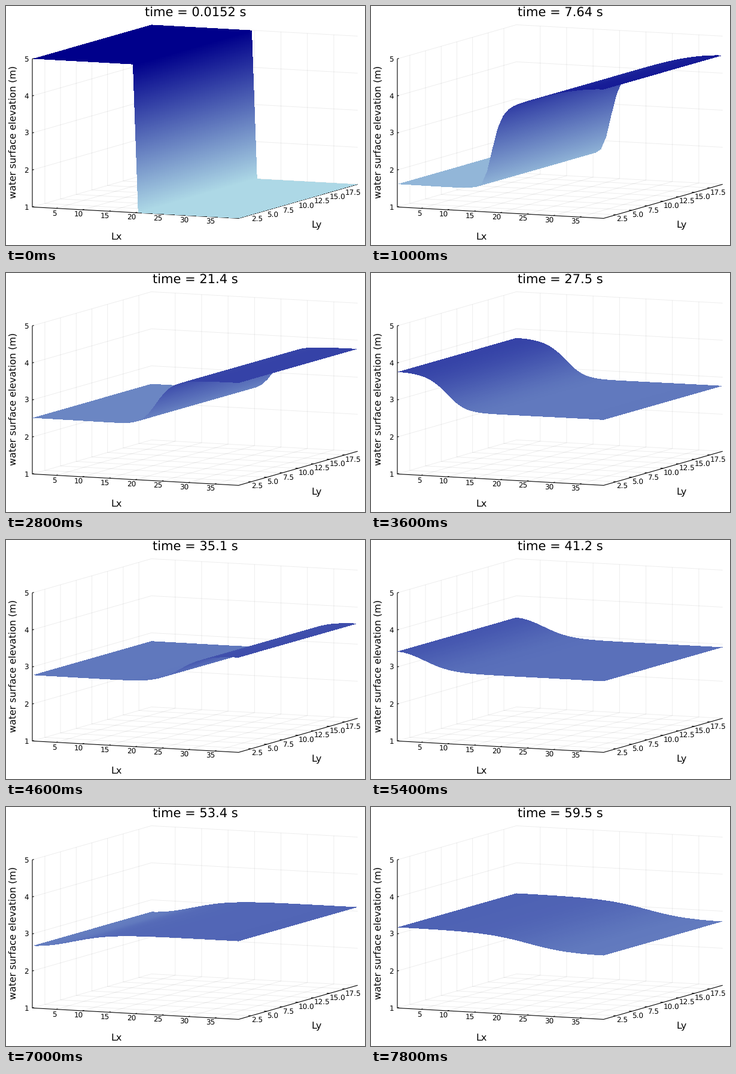
A matplotlib script for the animation above (8000 ms loop, 600 by 400 pixels).

```python
import numpy as np
import matplotlib.pyplot as plt
from matplotlib.animation import FuncAnimation
from matplotlib.collections import LineCollection
from matplotlib.colors import LinearSegmentedColormap

W, H, DPI = 600, 400, 100
FRAMES, INTERVAL = 40, 200

# Oblique projection: screen offsets of the full x, y and z ranges
X0, Y0 = 44.0, 336.4
AX = np.array([344.7, 19.0])
AY = np.array([199.0, -57.0])
AZ = np.array([0.0, -248.0])

# Shallow water model, one cell per metre
CELLS, G, DT, SKIP = 40, 10.0, 0.015245, 100
X_MIN, X_MAX = 0.5, 39.5
Y_MIN, Y_MAX = 0.5, 19.5
Z_MIN, Z_MAX = 1.0, 5.0

plt.rcParams["font.family"] = "DejaVu Sans"
plt.rcParams["text.hinting"] = "no_hinting"
plt.rcParams["text.hinting_factor"] = 1


def roe_step(h, q):
    """One Euler step with Roe fluxes and solid walls at both ends."""
    h = np.r_[h[0], h, h[-1]]
    q = np.r_[-q[0], q, -q[-1]]
    u, root = q / h, np.sqrt(h)
    state = np.array([h, q])
    flux = np.array([q, q * u + G * h**2 / 2])
    u_mean = ((root * u)[:-1] + (root * u)[1:]) / (root[:-1] + root[1:])
    c_mean = np.sqrt(G * (h[:-1] + h[1:]) / 2)
    sl = np.minimum(u_mean - c_mean, 0)
    sr = np.maximum(u_mean + c_mean, 0)
    jump = np.diff(state, axis=1)
    f = (sr * flux[:, :-1] - sl * flux[:, 1:] + sl * sr * jump) / (sr - sl)
    return state[:, 1:-1] - DT * np.diff(f, axis=1)


def simulate():
    h = np.where(np.arange(CELLS) < CELLS // 2, 5.0, 1.0)
    q = np.zeros(CELLS)
    history = [h]
    for _ in range(FRAMES - 1):
        for _ in range(SKIP):
            h, q = roe_step(h, q)
        history.append(h)
    return history


def project(x, y, z):
    a = (x - X_MIN) / (X_MAX - X_MIN)
    b = (y - Y_MIN) / (Y_MAX - Y_MIN)
    c = (z - Z_MIN) / (Z_MAX - Z_MIN)
    return np.array([X0, Y0]) + a * AX + b * AY + c * AZ


def render(h):
    """Height seen at each pixel; strips are painted from back to front."""
    img = np.full((H, W), np.nan)
    n = CELLS - 1
    for k in range(n):
        a0, a1 = k / n, (k + 1) / n
        left = int(X0 + a0 * AX[0])
        right = min(W, int(X0 + a1 * AX[0] + AY[0]) + 2)
        px = np.arange(left, right) + 0.5 - X0
        # part of the strip that crosses each pixel column
        s0 = np.maximum(a0, (px - AY[0]) / AX[0])
        s1 = np.minimum(a1, px / AX[0])
        ok = s0 <= s1

        def column(s):
            z = h[k] + (s * n - k) * (h[k + 1] - h[k])
            b = (px - s * AX[0]) / AY[0]
            rise = (z - Z_MIN) / (Z_MAX - Z_MIN)
            return z, Y0 + s * AX[1] + b * AY[1] + rise * AZ[1]

        z0, y0 = column(s0)
        z1, y1 = column(s1)
        ends = np.r_[y0[ok], y1[ok]]
        top, bottom = max(0, int(ends.min()) - 1), min(H, int(ends.max()) + 2)
        rows = np.arange(top, bottom)[:, None] + 0.5
        span = y1 - y0
        span = np.where(np.abs(span) < 1e-9, 1e-9, span)
        t = (rows - y0) / span
        hit = ok & (t >= 0) & (t <= 1)
        view = img[top:bottom, left:right]
        view[hit] = (z0 + t * (z1 - z0))[hit]
    return img


fig = plt.figure(figsize=(W / DPI, H / DPI), dpi=DPI, facecolor="white")
ax = fig.add_axes([0, 0, 1, 1])
ax.axis("off")


def points(size):
    return size * 72 / DPI


def lines(segments, color, width, zorder):
    ax.add_collection(LineCollection(segments, colors=[color],
                                     linewidths=points(width), zorder=zorder))


def label(x, y, text, size, ha="center", **kw):
    return ax.text(x, y, text, fontsize=points(size), ha=ha, va="baseline",
                   color="black", zorder=5, **kw)


def draw_axes():
    x_ticks = np.arange(5, 36, 5)
    y_ticks = np.arange(2.5, 18, 2.5)
    z_ticks = np.arange(1, 6)
    grid, black = [], []

    def add(group, *corners):
        group.append([project(*p) for p in corners])

    for x in x_ticks:
        add(grid, (x, Y_MIN, Z_MIN), (x, Y_MAX, Z_MIN), (x, Y_MAX, Z_MAX))
        add(black, (x, Y_MIN, Z_MIN), (x, Y_MIN + 0.25, Z_MIN))
        p = project(x, Y_MIN, Z_MIN)
        label(p[0] + 0.9, p[1] + 11.8, f"{x}", 11.85, "right")
    for y in y_ticks:
        add(grid, (X_MAX, y, Z_MIN), (X_MIN, y, Z_MIN), (X_MIN, y, Z_MAX))
        add(black, (X_MAX, y, Z_MIN), (X_MAX - 0.5, y, Z_MIN))
        p = project(X_MAX, y, Z_MIN)
        label(p[0] + 0.4, p[1] + 11.8, f"{y:.1f}", 11.85, "left")
    for z in z_ticks:
        add(grid, (X_MIN, Y_MIN, z), (X_MIN, Y_MAX, z), (X_MAX, Y_MAX, z))
        add(black, (X_MIN, Y_MIN, z), (X_MIN, Y_MIN + 0.25, z))
        p = project(X_MIN, Y_MIN, z)
        label(38, p[1] + 4.4, f"{z}", 11.85, "right")
    add(black, (X_MIN, Y_MIN, Z_MAX), (X_MIN, Y_MIN, Z_MIN),
        (X_MAX, Y_MIN, Z_MIN), (X_MAX, Y_MAX, Z_MIN))
    lines(grid, (0, 0, 0, 0.07), 1, 1)
    lines(black, "black", 1.1, 2)

    label(184.9, 391, "Lx", 16.3)
    label(519.1, 371.6, "Ly", 16.3)
    label(16.5, 211, "water surface elevation (m)", 16.3,
          rotation=90, rotation_mode="anchor")


draw_axes()
history = simulate()
water = LinearSegmentedColormap.from_list("water", ["lightblue", "darkblue"])
surface = ax.imshow(np.full((H, W), np.nan), cmap=water, vmin=Z_MIN, vmax=Z_MAX,
                    extent=(0, W, H, 0), interpolation="nearest",
                    aspect="auto", zorder=3)
title = label(316.3, 18.2, "", 20.7)
ax.set_xlim(0, W)
ax.set_ylim(H, 0)


def update(i):
    t = (SKIP * i + 1) * DT
    title.set_text(f"time = {float(f'{t:.3g}')} s")
    surface.set_data(np.ma.masked_invalid(render(history[i])))
    return surface, title


anim = FuncAnimation(fig, update, frames=FRAMES, interval=INTERVAL,
                     repeat=True, repeat_delay=0, blit=False)
plt.show()
```
